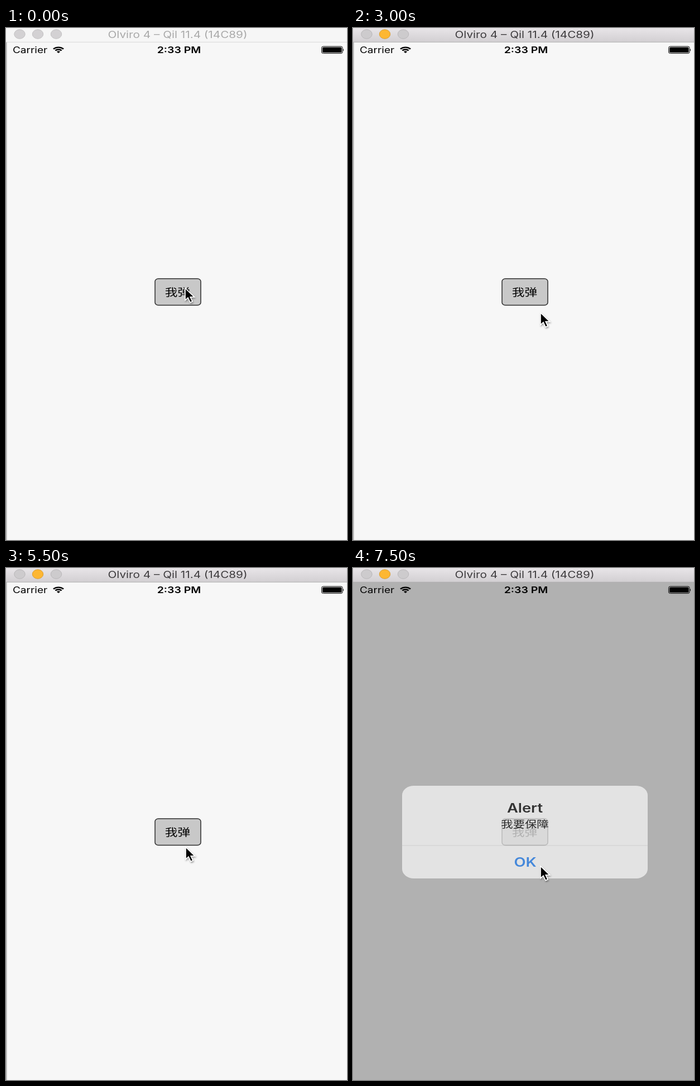
An HTML page for the animation above (8000 ms loop, 611 by 917 pixels).

```html
<!DOCTYPE html>
<html lang="zh-CN">
<head>
<meta charset="utf-8">
<title>Popup menu</title>
<style>
html, body { margin: 0; width: 100%; height: 100%; overflow: hidden; background: #f7f7f7; }
svg { display: block; width: 611px; height: 917px; }
text { font-family: Inter, "Noto Sans CJK SC", "Noto Sans CJK", sans-serif; }
.mid { text-anchor: middle; }
.bold { font-weight: 600; }
</style>
</head>
<body>
<svg viewBox="0 0 611 917">
  <defs>
    <linearGradient id="bar" x2="0" y2="1">
      <stop stop-color="#e8e5e8"/><stop offset="1" stop-color="#d2cfd2"/>
    </linearGradient>
    <filter id="soft" x="-20%" y="-20%" width="140%" height="140%">
      <feDropShadow dx="0" dy="1" stdDeviation="1.5" flood-opacity=".2"/>
    </filter>
    <filter id="drop" x="-50%" y="-50%" width="200%" height="200%">
      <feDropShadow dx="1" dy="2" stdDeviation="1.5" flood-opacity=".4"/>
    </filter>
  </defs>

  <rect width="611" height="917" fill="#f7f7f7"/>

  <!-- status bar -->
  <text data-at="12 45" font-size="15.6">Carrier</text>
  <g transform="translate(94 45) scale(1.22 1)" fill="none" stroke="#000" stroke-width="2.3">
    <path d="M-7.4-7.4A10.5 10.5 0 0 1 7.4-7.4M-4.6-4.6A6.5 6.5 0 0 1 4.6-4.6"/>
    <path d="M0 0L-2.5-2.5A3.5 3.5 0 0 1 2.5-2.5Z" fill="#000" stroke="none"/>
  </g>
  <text data-at="310 45" class="mid bold" font-size="16">2:33 PM</text>
  <rect x="565.5" y="33" width="37.5" height="12.5" rx="3" ry="2.5" fill="none" stroke="#000"/>
  <rect x="567" y="34.4" width="34.5" height="9.7" rx="1.5"/>
  <path d="M604 37Q606 39.3 604 41.6Z"/>

  <!-- button -->
  <rect x="267" y="449" width="82" height="47.5" rx="6" ry="5" fill="#c8c8c8" stroke="#2c2c2c" stroke-width="1.5"/>
  <text data-at="307.5 480" class="mid" font-size="18.6">我弹</text>

  <g id="menu">
    <rect x="276" y="503" width="163" height="171" rx="8" ry="7" fill="#e0e0e0" filter="url(#soft)"/>
    <g id="rows"></g>
  </g>

  <rect id="dim" y="25" width="611" height="892"/>
  <g id="alert">
    <rect x="88" y="390" width="440" height="166" rx="21" ry="17" fill="#f8f8f8"/>
    <path d="M88 497H528" stroke="#dadada"/>
    <text data-at="308 438" class="mid bold" font-size="22.4">Alert</text>
    <text id="message" data-at="308 465" class="mid" font-size="17.5"></text>
    <text data-at="308.5 535" class="mid bold" font-size="22.4" fill="#1a78ec">OK</text>
  </g>

  <!-- window frame -->
  <path d="M.8 25V917" stroke="#b4b4b4" stroke-width="1.6"/>
  <rect id="titlebar" width="611" height="25"/>
  <path id="edge" d="M0 25.3H611"/>
  <g id="lights"></g>
  <text id="title" data-at="307.5 17.5" class="mid" font-size="17">Olviro 4 – Qil 11.4 (14C89)</text>

  <path id="cursor" d="M0 0V21.5L5 17L9 25.5L13 23.8L9.2 15.8H16.5Z" stroke="#fff" stroke-width="1.6" filter="url(#drop)"/>
</svg>
<script>
const $ = id => document.getElementById(id);
const set = (id, attrs) => {
  for (const name in attrs) $(id).setAttribute(name, attrs[name]);
};

const items = ['我的收藏', '一起考试', '我要保障', '我要咨询'];
const colors = ['#f46f74', '#35a4f8', '#f46f74', '#f5777b'];
const icons = [
  // folder
  `<path d="M7 21V12H12L14 14H25V16H11L8 23H24L27 16H11" fill="#fff"/>
   <path d="M9 11L7 5L12 4L14 9M14 5L16 11M17 7H24V12M18 9H23M17 11H24" fill="none" stroke="#fff"/>`,
  // pencil
  `<path d="M6 21L8 15L18 7L22 10L12 19ZM19 6L21 4.5Q24 5 25 7L23 9Z" fill="#fff"/>
   <path d="M16 20.5H27" stroke="#fff" stroke-width="2" stroke-dasharray="2.5 1.7"/>`,
  // money bag
  `<path d="M12 4L15 5L17 4L19 5L22 4L19.5 9H14.5ZM14 10H20Q26 16 25 21Q24 23 17 23Q10 23 9 21Q8 16 14 10Z" fill="#fff"/>
   <path d="M14 13L17 16.5L20 13M17 16V21M14 17H20M14 19H20" fill="none" stroke="#f46f74" stroke-width="1.3"/>`,
  // dial
  `<path d="M25 8L33 15V24Q33 27 29 27H19L10 22Z" fill="#c9666b"/>
   <ellipse cx="17" cy="13" rx="10.5" ry="8" fill="none" stroke="#fff" stroke-width="3" stroke-dasharray="3 .8"/>
   <ellipse cx="17" cy="14" rx="8" ry="6.5" fill="#fff"/>
   <ellipse cx="17" cy="14" rx="4.3" ry="3.5" fill="none" stroke="#d4666b" stroke-width="1.3"/>
   <path d="M17 14L21 9" stroke="#d4666b" stroke-width="1.5"/>`
];
$('rows').innerHTML = items.map((label, i) => `
  <g transform="translate(287 ${512 + i * 38.2})">
    <rect width="33" height="27" rx="4.5" ry="4" fill="${colors[i]}"/>${icons[i]}
  </g>
  <text data-at="334 ${536.5 + i * 38.2}" font-size="16.2" fill="#555559">${label}</text>`).join('');

$('lights').innerHTML = [24.5, 57, 90].map((x, i) =>
  `<ellipse id="light${i}" cx="${x}" cy="11" rx="9.7" ry="8.2" fill="#cdcbcd" stroke="#b9b7b9"/>`).join('');

// The whole screen is wider than its natural proportions, so all type shares one aspect.
for (const t of document.querySelectorAll('text'))
  t.setAttribute('transform', `translate(${t.dataset.at}) scale(1.218 1)`);

// Each half second: cursor x, y, menu shown, alert opacity, chosen item
const steps = [
  [321, 466, 0, 0, 0], [321, 466, 0, 0, 0], [321, 466, 1, 0, 0], [350, 522, 1, 0, 0],
  [350, 522, 0, 0, 0], [350, 522, 0, 1, 0], [336, 510, 0, 0, 0], [321, 478, 1, 0, 1],
  [362, 556, 1, 0, 1], [358, 550, 0, 1, 1], [323, 522, 0, 1, 1], [322, 500, 0, 0, 1],
  [428, 665, 1, 0, 2], [372, 600, 1, 0, 2], [350, 560, 0, 1, 2], [336, 534, 0, .71, 2]
];

function draw(now) {
  const step = Math.floor(now % 8000 / 500);
  const [x, y, menu, alpha, item] = steps[step];
  const active = step > 0;
  set('cursor', { transform: `translate(${x} ${y})` });
  set('menu', { opacity: menu });
  set('dim', { opacity: alpha * .405 });
  set('alert', { opacity: alpha });
  if ($('message').textContent !== items[item]) $('message').textContent = items[item];
  set('titlebar', { fill: active ? 'url(#bar)' : '#f6f6f6' });
  set('edge', { stroke: active ? '#b1afb1' : '#d9d9d9' });
  set('title', { fill: active ? '#3c3a3c' : '#a9a9a9' });
  set('lights', { opacity: active ? 1 : .85 });
  set('light1', { fill: active ? '#fdb733' : '#cdcbcd', stroke: active ? '#dc9d2c' : '#b9b7b9' });
}

const start = performance.now();
function tick() {
  draw(performance.now() - start);
  requestAnimationFrame(tick);
}
tick();
</script>
</body>
</html>
```
